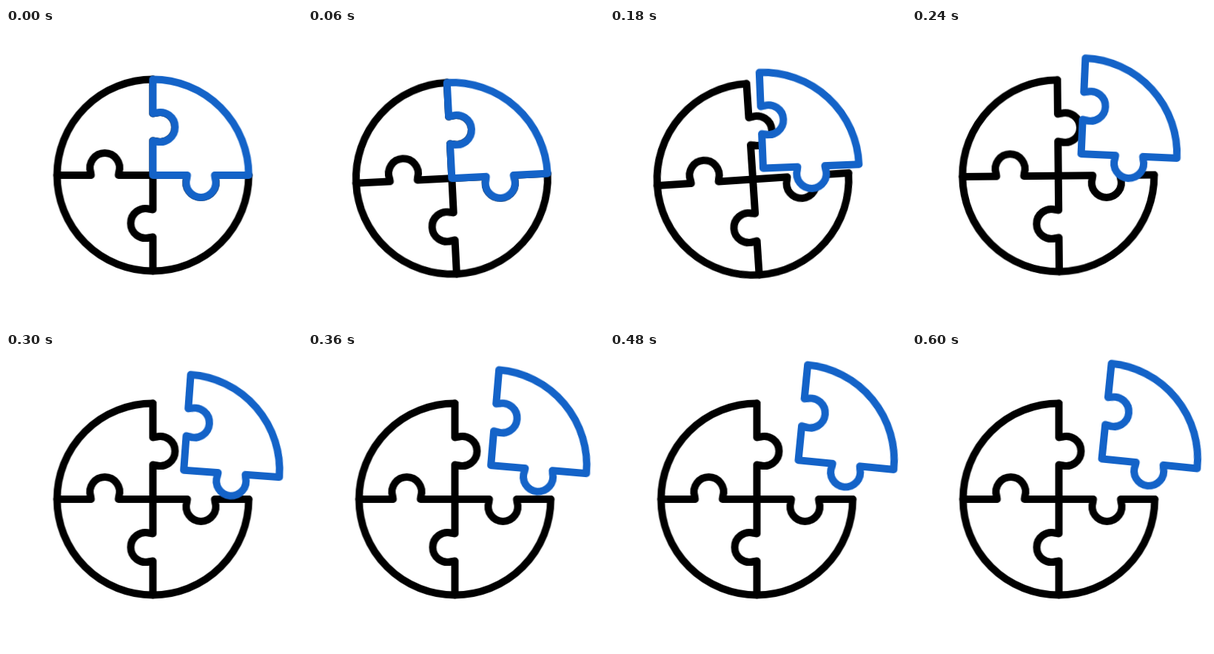
An HTML page for the animation above (0.63 s loop, 400 by 400 pixels).

```html
<!DOCTYPE html>
<html lang="en">
<head>
<meta charset="utf-8">
<title>Puzzle wheel</title>
<style>
  html, body { margin: 0; width: 100%; height: 100%; overflow: hidden; background: #fff; }
  svg { display: block; width: 100%; height: 100%; }
  path { stroke-width: 10; stroke-linecap: round; stroke-linejoin: round; }
  .wheel { fill: none; stroke: #000; }
  .piece { fill: #fff; stroke: #1463c8; }
</style>
</head>
<body>
<svg viewBox="0 0 400 400">
  <g transform="translate(198.5 198.9)">
    <g id="wheel">
      <g class="wheel">
        <path d="M129.5 0A129.5 129.5 0 1 1 0 -129.5"/>
        <g id="edges"></g>
      </g>
      <path id="piece" class="piece" d="M0 0V-46.5L4 -45.9A20 20 0 1 0 4 -84.1L0 -83.5V-129.5
        A129.5 129.5 0 0 1 129.5 0H83.5L84.1 4A20 20 0 1 1 45.9 4L46.5 0Z"/>
    </g>
  </g>
</svg>
<script>
  const LOOP = 630, STEP = 30, COUNT = LOOP / STEP;
  const $ = id => document.getElementById(id);

  const edge = 'M0 0V-46.5L4 -45.9A20 20 0 1 0 4 -84.1L0 -83.5V-129.5';
  $('edges').innerHTML = [0, 90, 180, 270]
    .map(a => `<path d="${edge}" transform="rotate(${a})"/>`).join('');

  const span = (t, from, to) => Math.min(1, Math.max(0, (t - from) / (to - from)));
  const sine = p => (1 - Math.cos(Math.PI * p)) / 2;

  // Cubic bezier ease (x1, 0, x2, 1), solved by bisection.
  function bezier(x, x1, x2) {
    let lo = 0, hi = 1;
    for (let i = 0; i < 30; i++) {
      const s = (lo + hi) / 2, r = 1 - s;
      if (3 * x1 * s * r * r + 3 * x2 * s * s * r + s ** 3 < x) lo = s; else hi = s;
    }
    return lo * lo * (3 - 2 * lo);
  }

  const pose = (k, x, y, deg) =>
    `translate(${(k * x).toFixed(3)}px, ${(k * y).toFixed(3)}px) rotate(${(k * deg).toFixed(3)}deg)`;

  // The wheel winds back and returns.
  const wheelPose = t => pose(sine(span(t, 0, 120)) - sine(span(t, 120, 270)), -8.3, 8.5, -5.8);
  // The piece is thrown out, relative to the wheel.
  const piecePose = t => pose(bezier(span(t, 120, 600), 0.12, 0.16), 58, -54.5, 5.8);

  function play(el, poseAt) {
    const frames = Array.from({ length: COUNT + 1 }, (_, i) => ({
      offset: i % COUNT ? i / COUNT - 1e-6 : i / COUNT,
      transform: poseAt(Math.min(i, COUNT - 1) * STEP),
      easing: 'steps(1, end)'
    }));
    el.animate(frames, { duration: LOOP, iterations: Infinity });
  }

  play($('wheel'), wheelPose);
  play($('piece'), piecePose);
</script>
</body>
</html>
```
